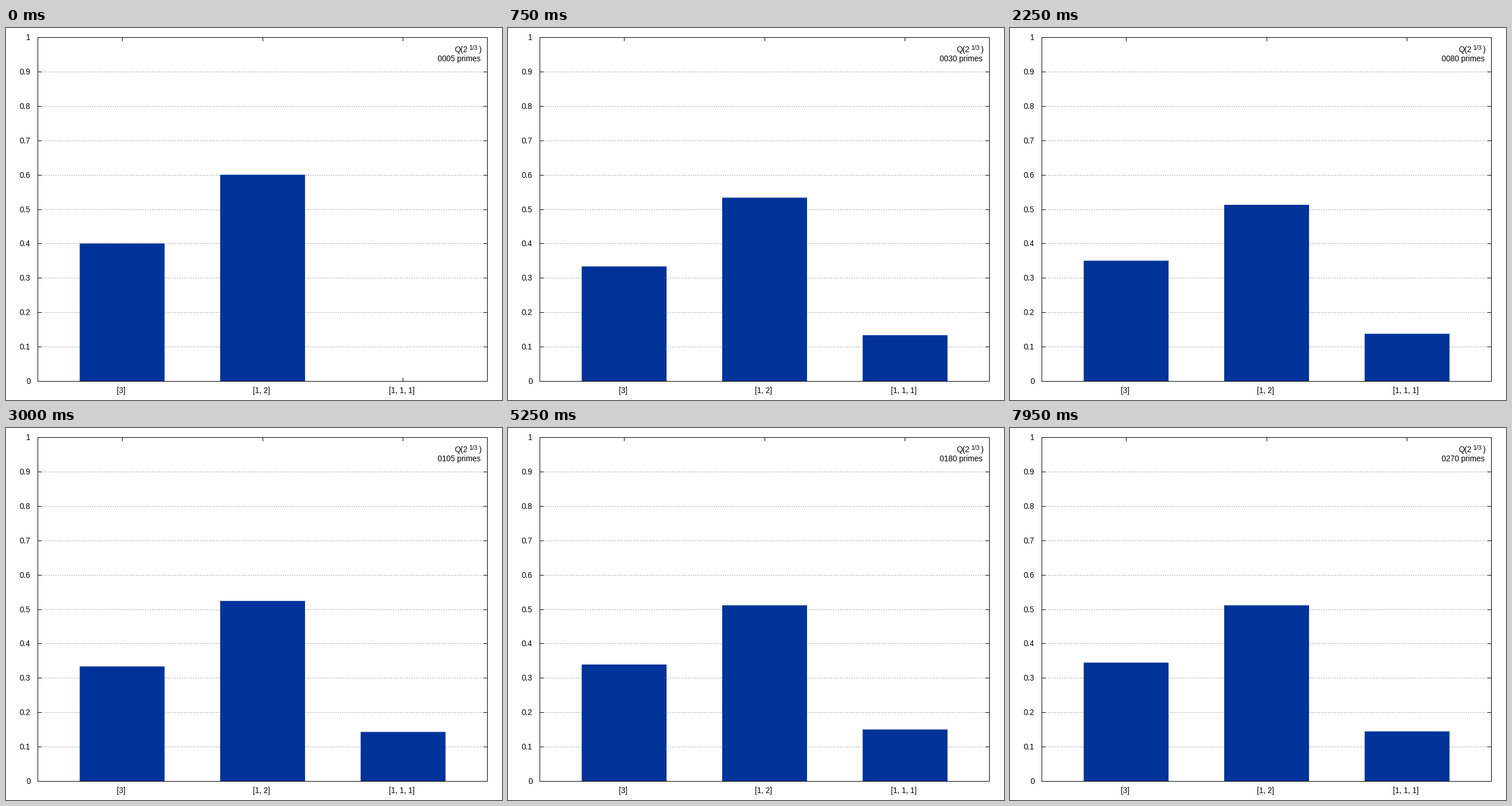
A matplotlib script for the animation above (8 s loop, 864x648 px).

```python
import math

import matplotlib.pyplot as plt
from matplotlib.animation import FuncAnimation
from matplotlib.patches import Rectangle

WIDTH, HEIGHT, DPI = 864, 648, 72
LEFT, RIGHT, TOP, BOTTOM = 55, 838, 16, 615
TICK = 7
FONT_SIZE = 13.6

# One category every UNIT pixels, with 0.6 of a unit free at either end
UNIT = (RIGHT - LEFT) / 3.2
CENTERS = [LEFT + 0.5 + UNIT * (k + 0.6) for k in range(3)]
BAR_WIDTH = 0.6 * UNIT + 1

INTERVAL, FRAMES = 50, 160
FRAMES_PER_STEP, PRIMES_PER_STEP = 3, 5

plt.rcParams["font.family"] = "Liberation Sans"


def level(value):
    """Height on the stage of a value between 0 and 1."""
    return BOTTOM - (BOTTOM - TOP) * value


def unramified_primes(count):
    """The first primes from 5 on; 2 and 3 ramify in the field."""
    primes = [2, 3]
    n = 5
    while len(primes) < count + 2:
        if all(n % p for p in primes if p * p <= n):
            primes.append(n)
        n += 2
    return primes[2:]


def splitting_type(p):
    """0, 1, 2 for x^3 - 2 factoring mod p as [3], [1, 2], [1, 1, 1]."""
    if p % 3 == 2:
        return 1
    return 2 if pow(2, (p - 1) // 3, p) == 1 else 0


STEPS = math.ceil(FRAMES / FRAMES_PER_STEP)
TYPES = [splitting_type(p) for p in unramified_primes(STEPS * PRIMES_PER_STEP)]

fig = plt.figure(figsize=(WIDTH / DPI, HEIGHT / DPI), dpi=DPI, facecolor="white")
ax = fig.add_axes([0, 0, 1, 1])
ax.set_xlim(0, WIDTH)
ax.set_ylim(HEIGHT, 0)
ax.axis("off")


def line(x0, y0, x1, y1, color="black", zorder=1, **style):
    ax.plot([x0, x1], [y0, y1], color=color, lw=1, zorder=zorder, snap=False,
            solid_capstyle="butt", dash_capstyle="butt", **style)


def hline(y, x0, x1, **style):
    line(x0, y + 0.5, x1, y + 0.5, **style)


def vline(x, y0, y1, **style):
    line(x + 0.5, y0, x + 0.5, y1, **style)


def label(x, baseline, text, size=FONT_SIZE):
    return ax.text(x, baseline, text, fontsize=size, color="black",
                   ha="left", va="baseline", zorder=4)


# Grid, ticks and value labels
for k in range(11):
    y = math.floor(level(k / 10) + 0.5)
    if 0 < k < 10:
        hline(y, LEFT + TICK, RIGHT - TICK + 1, color="#a0a0a0",
              linestyle=(0, (2, 2)))
        hline(y, LEFT, LEFT + TICK)
        hline(y, RIGHT - TICK + 1, RIGHT + 1)
        label(24, y + 5, f"{k / 10:.1f}")
    else:
        label(35.5, y + 5, str(k // 10))

for center in CENTERS:
    x = math.floor(center)
    vline(x, TOP, TOP + TICK)
    vline(x, BOTTOM - TICK + 1, BOTTOM + 1)

# Frame
for y in (TOP, BOTTOM):
    hline(y, LEFT, RIGHT + 1, zorder=3)
for x in (LEFT, RIGHT):
    vline(x, TOP, BOTTOM + 1, zorder=3)

for x, text in ((193, "[3]"), (430, "[1, 2]"), (667, "[1, 1, 1]")):
    label(x, 636, text)

# Field name with its exponent
label(781, 42, "Q(2")
label(806, 38, "1/3", FONT_SIZE * 0.8)
label(823.5, 42, ")")
counter = label(751.5, 58, "")

bars = [ax.add_patch(Rectangle((center - BAR_WIDTH / 2, BOTTOM), BAR_WIDTH, 0,
                               facecolor="#003399", linewidth=0, snap=False,
                               zorder=2))
        for center in CENTERS]


def update(frame):
    count = PRIMES_PER_STEP * (frame // FRAMES_PER_STEP + 1)
    seen = TYPES[:count]
    for kind, bar in enumerate(bars):
        top = level(seen.count(kind) / count)
        bar.set_y(top)
        bar.set_height(BOTTOM + 0.5 - top)
    counter.set_text(f"{count:04d} primes")
    return [*bars, counter]


animation = FuncAnimation(fig, update, frames=FRAMES, interval=INTERVAL,
                          repeat=True, repeat_delay=0, blit=False)
plt.show()
```
